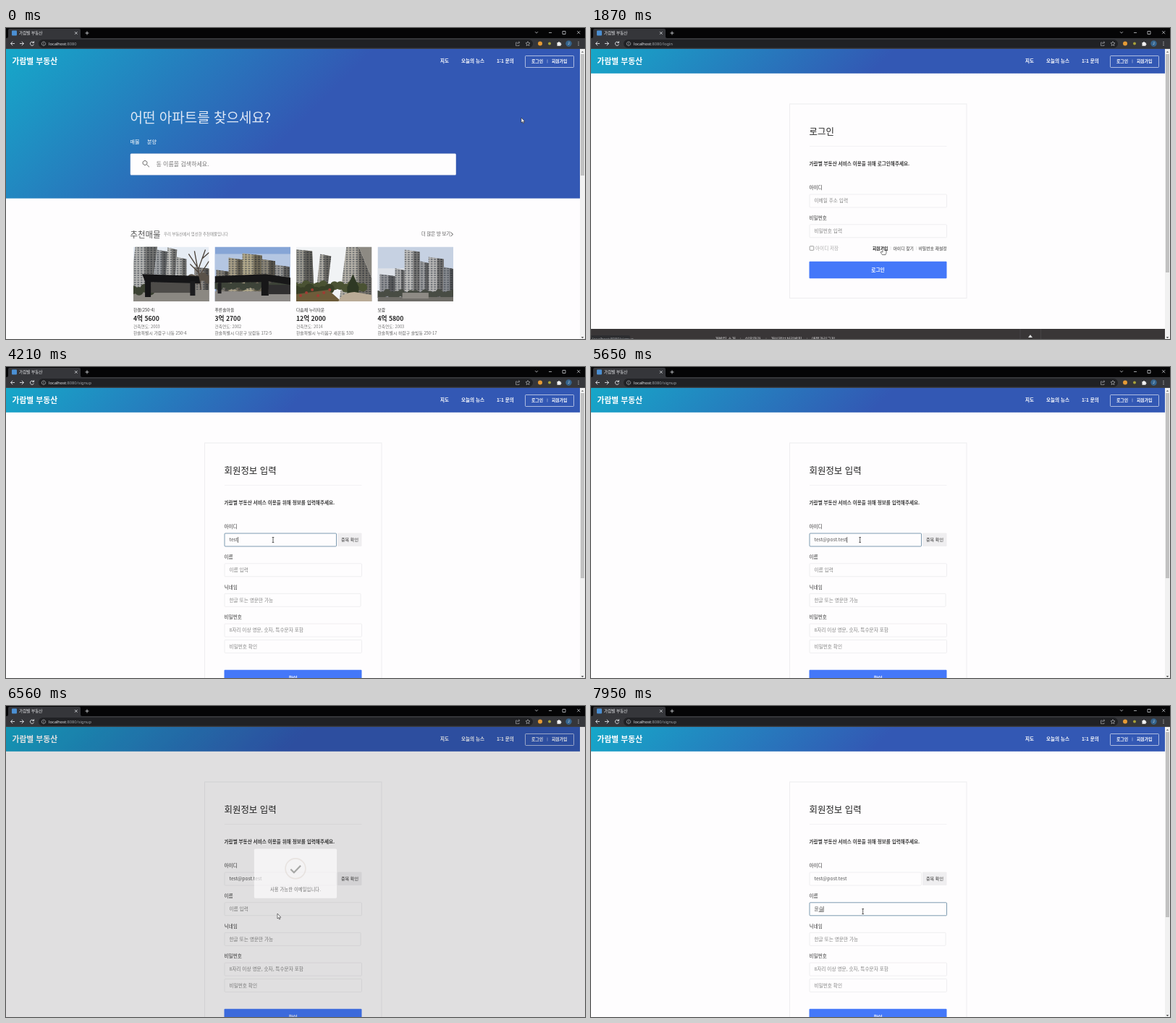
An HTML page that plays this animation: 800 by 430 pixels, repeating every 8000 ms.

```html
<!DOCTYPE html>
<html lang="ko">
<head>
<meta charset="utf-8">
<style>
html, body { margin: 0; width: 100%; height: 100%; overflow: hidden; }
svg { display: block; width: 800px; height: 430px; background: #fefdfe; }
svg svg { width: auto; height: auto; }
text { font-family: "Noto Sans CJK KR", "Noto Sans CJK", sans-serif; white-space: pre; }
.latin { font-family: "Noto Sans", sans-serif; }
</style>
</head>
<body>
<svg id="stage" viewBox="0 0 800 430"></svg>
<script>
const BRAND = '가람별 부동산', BLUE = '#4478f9', DARK = '#222', HINT = '#858585', EDGE = '#eeedef';

const rect = (x, y, w, h, fill, extra = '') =>
  `<rect x="${x}" y="${y}" width="${w}" height="${h}" fill="${fill}" ${extra}/>`;
const path = (d, fill, extra = '') => `<path d="${d}" fill="${fill}" ${extra}/>`;
const line = (d, color, width = 1) => path(d, 'none', `stroke="${color}" stroke-width="${width}"`);
const dot = (x, y, r, fill) => `<circle cx="${x}" cy="${y}" r="${r}" fill="${fill}"/>`;
// y is the vertical middle of the line of text
const text = (x, y, size, str, color = DARK, weight = 400, extra = '') =>
  `<text x="${x}" y="${y + size * .37}" font-size="${size}" fill="${color}" font-weight="${weight}" ${extra}>${str}</text>`;
const middle = 'text-anchor="middle"';

function browser() {
  const gray = '#dfe1e5';
  return rect(0, 0, 800, 28.6, '#050506') +
    path('M1 14Q3 14 3 12V3Q3 1 5 1H101Q103 1 103 3V12Q103 14 105 14Z', '#35363a') +
    rect(0, 14, 800, 14.6, '#35363a') + rect(45, 16, 683, 11.5, '#202124', 'rx="5.7"') +
    rect(8, 3.5, 7, 7, '#4b8fd2', 'rx="1"') + text(18, 7, 5.6, BRAND, '#e8eaed') +
    line('M95 5.2l3.6 3.6m0-3.6l-3.6 3.6M109.5 7h5M112 4.5v5', gray, .8) +
    line('M731 5.2l2 2 2-2M750 6.5h4M769 4.5h4v4h-4zM789.2 4.2l4 4m0-4l-4 4', gray, .7) +
    line('M12 21.5H6.5M9.2 18.8L6.5 21.5 9.2 24.2M19 21.5H24.5M21.8 18.8L24.5 21.5 21.8 24.2', gray, .9) +
    line('M38 20A2.6 2.6 0 1 0 38.5 22.5M38.6 18.3V20.6H36.3', gray, .9) +
    line('M52 19a2.7 2.7 0 1 0 .01 0M52 21.3v2M52 20v.7', '#b5b8bc', .7) +
    `<text class="latin" x="59" y="24" font-size="5.7" fill="#e8eaed">localhost<tspan fill="#9aa0a6">:8080<tspan id="route"></tspan></tspan></text>` +
    line('M706.5 20H704.5V24.5H709V23M706 22.5Q706.5 20 709.5 20M708 18.5l1.8 1.5-1.8 1.5', '#b5b8bc', .6) +
    line('M721 18.6l.9 2 2.1.2-1.6 1.5.5 2.2-1.9-1.2-1.9 1.2.5-2.2-1.6-1.5 2.1-.2z', '#c8cacd', .6) +
    dot(738, 21.5, 3, '#e59a35') + dot(751, 21.5, 2, '#a8a13a') +
    path('M761.5 20h1.5a1 1 0 1 1 2 0h1.5v1.5a1 1 0 1 1 0 2v1.3h-5z', '#f1f1f1') +
    dot(777.5, 21.5, 4.2, '#35658f') + text(777.5, 21.5, 4.5, 'J', '#fff', 400, middle) +
    [19.3, 21.5, 23.7].map(y => dot(791, y, .6, gray)).join('');
}

function header(h) {
  // 135 degree gradient spanning a box of width 793
  const half = (793 + h) / 4, cx = 396.5, cy = 28.6 + h / 2, id = 'sky' + h;
  return `<linearGradient id="${id}" gradientUnits="userSpaceOnUse" x1="${cx - half}" y1="${cy - half}" x2="${cx + half}" y2="${cy + half}">
    <stop stop-color="#16a8c9"/><stop offset=".51" stop-color="#3358b4"/></linearGradient>` +
    rect(0, 28.6, 793, h, `url(#${id})`) +
    text(8.5, 46.5, 10.8, BRAND, '#fff', 700) +
    text(600, 46, 6.55, '지도', '#fff', 700) + text(629, 46, 6.55, '오늘의 뉴스', '#fff', 700) +
    text(678, 46, 6.55, '1:1 문의', '#fff', 700) +
    rect(717.5, 38.5, 67, 16, 'none', 'stroke="#fff" stroke-opacity=".75" stroke-width=".8" rx="1"') +
    text(726, 46, 5.83, '로그인', '#fff', 700) + text(754, 46, 5.83, '회원가입', '#fff', 700) +
    line('M748 43.5v5', '#c3cfec', .6);
}

const facade = d => path(d, '#000', 'opacity=".08"') + path(d, 'url(#windows)') + path(d, 'url(#side)');
const tower = (x, top, w, color, lean = 0) => {
  const d = `M${x} 76L${x + lean} ${top}l${w} 3L${x + w} 76Z`;
  return path(d, color) + facade(d);
};
// a row of round tree tops between two points
const trees = (x, y, n, r, color) => Array.from({ length: n }, (_, i) =>
  dot(x + i * r * 1.3, y + Math.sin(i * 2.3) * r * .4, r, color)).join('');
const photos = [
  rect(0, 0, 104, 76, '#e6ecf4') + tower(-6, -4, 30, '#c9c9c6', 9) + tower(26, 4, 17, '#b0b2b4', 6) +
    tower(43, 1, 13, '#d2d1cd', 4) + tower(59, 14, 14, '#c4c3bf') + tower(84, 28, 24, '#9a958e') +
    line('M93 60L89 30 76 10M89 32L99 4M88 28L84 6M91 40L104 20M90 36L78 24M95 16L104 8', '#4a4038', 1.3) +
    trees(80, 44, 5, 6, '#5a5249') + rect(0, 60, 104, 16, '#8b8882') + trees(0, 60, 4, 6, '#3c4233') +
    rect(24, 49, 58, 15, '#4e4c49') +
    path('M12 38L90 41 92 51 24 49V70H16V48Z', '#151517') + rect(78, 48, 7, 20, '#1c1c1e'),
  rect(0, 0, 104, 76, '#86a5d6') + rect(0, 10, 104, 34, '#b4c6e2') + tower(2, 32, 20, '#8f8b80') +
    tower(19, 15, 20, '#b8ae92') + tower(38, 9, 27, '#c4b998') + tower(64, 17, 19, '#989181') + tower(83, 25, 20, '#a9a8a5') +
    trees(0, 54, 17, 5, '#3d4338') + rect(0, 62, 104, 14, '#8f8c89') +
    path('M0 41L70 38 104 43V53L74 48V68H64V49L0 50Z', '#171718') + rect(74, 53, 30, 13, '#302f30') + rect(4, 50, 5, 15, '#1e1e1f'),
  rect(0, 0, 104, 76, '#f1f3f5') + tower(-4, 3, 29, '#aaa89e', -3) + tower(26, 10, 15, '#bebbb2', 7) +
    path('M60 70L69 0H86L104 44V76H60Z', '#c6c2b8') + facade('M60 70L69 0H86L104 44V76H60Z') +
    path('M86 0H104V44Z', '#8d8a83') + trees(-2, 55, 13, 6, '#4a5233') + trees(0, 61, 6, 7, '#383f27') +
    path('M70 56l8-18 8 18v12H70z', '#2e3824') + path('M0 66L44 60 62 76H0Z', '#6d5c3a') +
    [6, 14, 22, 30, 38, 46].map((x, i) => dot(x, 68 - i % 3 * 4, 2, '#a03c34')).join('') +
    path('M58 76Q62 64 80 63L104 67V76Z', '#b9ab97'),
  rect(0, 0, 104, 76, '#c6d1e2') + rect(0, 30, 104, 46, '#dde1e8') + tower(3, 38, 22, '#9fa1a5') + tower(24, 30, 15, '#bdbdbd') +
    tower(37, 4, 21, '#d0cfcd') + tower(58, 20, 13, '#a9aaac') + tower(70, 14, 21, '#c9c8c7') + tower(90, 28, 16, '#96999e') +
    trees(0, 66, 17, 5, '#484c44') + rect(0, 70, 104, 6, '#6f6d68') + rect(34, 64, 36, 8, '#8e8b85')
];
const homes = [
  ['한결(250-4)', '4억 5600', 2003, '가람구 나동 250-4'],
  ['푸른솔마을', '3억 2700', 2002, '다온구 보람동 172-5'],
  ['다솜채 누리타운', '12억 2000', 2014, '누리봄구 새온동 530'],
  ['보람', '4억 5800', 2003, '하람구 솔빛동 250-17']
];

function homePage() {
  return header(207) + text(171.5, 123.8, 19, '어떤 아파트를 찾으세요?', '#dfe8f6', 300) +
    text(171.5, 157.5, 7.1, '매물', '#fff', 500) + text(195, 157.5, 7.1, '분양', '#fff', 500) +
    rect(171.7, 173.4, 450.2, 30, '#fefdfe', 'rx="1.5" stroke="#24428f" stroke-opacity=".25" stroke-width=".8"') +
    line('M192 183.5a3 3 0 1 0 .01 0M194.3 188.7L198 192.3', '#666', 1) +
    text(207.5, 188.5, 8, '동 이름을 검색하세요.', '#777') +
    text(171.5, 285.5, 11.4, '추천매물', '#555', 300) +
    text(218, 285, 5.4, '우리 부동산에서 엄선한 추천매물입니다', HINT) +
    text(574, 285, 6.3, '더 많은 방 보기', '#555') + line('M614.5 282.5l3 2.7-3 2.7', '#555', 1) +
    homes.map(([name, price, year, place], i) => {
      const x = 176 + i * 112.5;
      return `<svg x="${x}" y="302.5" width="104.5" height="75.5" viewBox="0 0 104 76" preserveAspectRatio="none" style="width:104.5px;height:75.5px">${photos[i]}</svg>` +
        text(x, 390, 5.83, name, '#333') + text(x, 401.5, 8.65, price, '#222', 700) +
        text(x, 413, 5.7, '건축연도: ' + year, '#777') + text(x, 421.5, 5.83, '한솔특별시 ' + place, '#666');
    }).join('');
}

const card = (h, title) => header(34.2) + rect(274.5, 105, 244.5, h, 'none', `stroke="${EDGE}"`) +
  text(301.5, 143, 12.45, title) + line('M302 163.5H491.5', '#f3f2f4');
const lead = (y, str) => text(301.5, y, 6.6, str, '#3a3a3a', 700);
const box = (y, w = 189.5, id = '') =>
  rect(302, y, w, 18, '#fefdfe', `${id && `id="${id}"`} rx="1" stroke="${EDGE}" stroke-width=".9"`);
const field = (label, y, hint, w) => (label && text(301.5, y - 18, 6.6, label, '#333')) + box(y - 9, w) + text(308.5, y, 6.67, hint, HINT);
const button = (y, label, id = '') => rect(301.5, y, 190, 23.5, BLUE, `rx="1" ${id && `id="${id}"`}`) +
  text(396.5, y + 11.8, 6.67, label, '#fff', 700, middle);

function footer(y) {
  const items = [[171.5, '개발팀 소개'], [213, '이용약관'], [248.5, '개인정보처리방침'], [305, '매물관리규정']];
  return rect(0, y, 793, 40, '#393637') + line(`M0 ${y + 27}H793`, '#2f2c2d') +
    items.map(([x, s]) => text(x, y + 14, 5.83, s, '#d5d4d5')).join('') +
    line([206.5, 242, 298.5].map(x => `M${x} ${y + 12}v5`).join(''), '#6a6768', .7) +
    line(`M593 ${y}v27M621.5 ${y}v27`, '#4b4849', .8) +
    path(`M604 ${y + 12}l3-4 3 4z`, '#ddd') + text(607, y + 18.5, 5.2, 'TOP', '#ccc', 400, middle);
}

function loginPage() {
  return card(268.5, '로그인') + lead(188, BRAND + ' 서비스 이용을 위해 로그인해주세요.') +
    field('아이디', 239, '이메일 주소 입력') + field('비밀번호', 280.8, '비밀번호 입력') +
    rect(302.2, 301.7, 5.6, 5.6, '#fff', 'rx=".8" stroke="#777" stroke-width=".7"') + text(310, 304.5, 6.6, '아이디 저장', '#aaa') +
    text(389, 304.5, 5.83, '회원가입', DARK, 700) + text(417.5, 304.5, 5.83, '아이디 찾기', '#333') +
    text(452.5, 304.5, 5.83, '비밀번호 재설정', '#333') + line('M414 302v5M449.5 302v5', '#ddd', .6) +
    button(322.8, '로그인') + footer(416);
}

function termsPage() {
  const rows = [[198, '모두 동의합니다.', '#333'], [226, '[필수] 만 14세 이상입니다.', '#555'],
    [244, `[필수] ${BRAND} 서비스 이용약관 동의`, '#555'], [262.3, '[필수] 개인정보 수집 및 이용 동의', '#555']];
  return card(255.5, '회원가입') + lead(174.5, `환영합니다! ${BRAND} 서비스 이용약관에 동의해주세요.`) +
    rows.map(([y, s, c], i) => text(311, y, 6.6, s, c) +
      rect(302.2, y - 3, 6, 6, '#fff', 'rx=".8" stroke="#777" stroke-width=".7"') +
      (i ? line(`M486.5 ${y - 3}l3.5 3-3.5 3`, '#888', .8) : '')).join('') +
    `<g id="checks">${rows.map(([y]) => rect(301.7, y - 3.5, 7, 7, '#1a73e8', 'rx="1"') +
      line(`M303.3 ${y}l1.4 1.5 2.6-3`, '#fff', 1)).join('')}</g>` +
    text(301.5, 282.7, 5.75, '만 14세 이상 회원 가입 가능합니다.', '#999') +
    text(301.5, 292.3, 5.75, '해당 내용은 <tspan fill="#3d8be8">이용약관 및 정책</tspan> 에서도 확인이 가능합니다.', '#999') +
    button(310, '동의하고 진행하기', 'agree') + footer(403);
}

const entry = (id, y, hint) => text(308.5, y, 6.67, hint, HINT, 400, `id="${id}Hint"`) + text(308.5, y, 6.67, '', '#555', 400, `id="${id}Text"`);

function infoPage() {
  return card(400, '회원정보 입력') + lead(188, BRAND + ' 서비스 이용을 위해 정보를 입력해주세요.') +
    text(301.5, 221, 6.6, '아이디', '#333') + box(230, 154.5, 'mailBox') + entry('mail', 239, '이메일 주소 입력') +
    rect(458, 229.5, 33.5, 18.5, '#efeef0', 'rx="1"') + text(475, 239, 6.1, '중복 확인', '#333', 400, middle) +
    text(301.5, 262.8, 6.6, '이름', '#333') + box(271.8, 189.5, 'nameBox') + entry('name', 280.8, '이름 입력') +
    field('닉네임', 322.3, '한글 또는 영문만 가능', 188) + field('비밀번호', 364, '8자리 이상 영문, 숫자, 특수문자 포함') +
    field('', 386.3, '비밀번호 확인') + button(418.8, '확인') + rect(0, 0, .7, 8, '#333', 'id="caret"');
}

const views = { home: homePage, login: loginPage, terms: termsPage, info: infoPage };
const thumbs = { home: 168, login: 302, terms: 310, info: 256 };
const routes = { home: '', login: '/login', terms: '/signup', info: '/signup' };
const cursors = {
  arrow: path('M0 0V7L1.6 5.6 2.7 8 3.8 7.5 2.7 5.2H4.8Z', '#fff', 'stroke="#222" stroke-width=".6"'),
  hand: path('M-1 1Q0-.5 1 1V4L4 5Q4.5 8 3 10.5H-1.5L-4 7Q-3.5 5.5-1 7Z', '#fff', 'stroke="#222" stroke-width=".6"'),
  ibeam: line('M-1.3-3.5H1.3M0-3.5V3.5M-1.3 3.5H1.3', '#333', .8)
};
const groups = (set, draw) => Object.keys(set).map(k => `<g id="${k}">${draw(set[k])}</g>`).join('');
const $ = id => document.getElementById(id);

$('stage').innerHTML =
  `<pattern id="windows" width="4.5" height="3.2" patternUnits="userSpaceOnUse">${rect(.8, .7, 2.8, 1.6, '#343a44', 'opacity=".62"')}</pattern>
  <linearGradient id="side"><stop offset=".5" stop-opacity="0"/><stop offset=".62" stop-opacity=".38"/></linearGradient>` +
  groups(views, draw => draw()) +
  `<g id="scroll">${rect(793, 28.6, 7, 402, '#f1f1f1')}${rect(794, 36, 5, 0, '#c1c1c1', 'id="thumb"')}
    ${path('M794.8 34l1.7-2 1.7 2z', '#777')}${path('M794.8 427l1.7 2 1.7-2z', '#444')}</g>` +
  `<g id="status">${path('M0 425H52Q54 425 54 427V430H0Z', '#2c2d30')}
    <text id="link" class="latin" x="2" y="431.5" font-size="5.5" fill="#a5a8ac"></text></g>` +
  rect(0, 28.6, 800, 402, '#000', 'id="shade"') +
  `<g id="modal">${rect(-68.5, -40.8, 137, 81.8, '#fefdfe', 'rx="2"')}
    <circle cy="-8" r="16.7" fill="none" stroke="#ece6e1" stroke-width="2"/>
    <path id="tick" d="M-8-7L-2.5-1.5 8.5-13" fill="none" stroke="#8c8d8a" stroke-width="2.6" pathLength="1" stroke-dasharray="1 2"/>
    ${text(0, 27, 7.5, '사용 가능한 이메일입니다.', '#444', 400, middle + ' letter-spacing=".15"')}</g>` +
  browser() + `<g id="pointer">${groups(cursors, shape => shape)}</g>`;

const OPEN = 5780, CLOSE = 6516;
const pageTimes = [[0, 'home'], [1120, 'login'], [1920, 'terms'], [3150, 'info']];
const linkTimes = [[0, ''], [520, 'login'], [1260, ''], [1740, 'signup'], [2020, '']];
const cursorTimes = [[0, 'arrow'], [480, 'hand'], [1250, 'arrow'], [1680, 'hand'], [2000, 'arrow'], [2980, 'hand'],
  [3200, 'arrow'], [3540, 'ibeam'], [5720, 'hand'], [OPEN, 'arrow'], [6760, 'ibeam']];
const focusTimes = [[0, ''], [3680, 'mail'], [5750, ''], [6900, 'name']];
const nameTimes = [[0, ''], [7090, 'd'], [7200, 'db'], [7360, 'd'], [7430, ''], [7500, 'ㅇ'], [7570, '유'], [7640, '윤'],
  [7720, '윤ㅅ'], [7800, '윤스'], [7920, '윤슬']];
const mailTimes = [[0, ''], ...[...'test@post.test'].map((c, i, all) =>
  [i < 4 ? 3950 + i * 67 : 4480 + (i - 4) * 88, all.slice(0, i + 1).join('')])];
const moves = [[0, 712, 124], [50, 712, 124], [600, 778, 48], [850, 779, 49], [910, 753, 49], [1120, 753, 49], [1760, 404, 303],
  [1960, 404, 303], [2290, 304, 197], [2440, 304, 197], [2790, 428, 372], [2850, 428, 372], [3060, 400, 322], [3170, 400, 322],
  [3620, 369, 239], [5640, 369, 239], [5760, 482, 238], [6060, 482, 238], [6430, 375, 287], [6620, 375, 287], [6880, 375.7, 284]];

const at = (list, t) => list.findLast(([start]) => t >= start)[1];
const clamp = x => Math.min(1, Math.max(0, x));
const show = (id, on) => $(id).setAttribute('visibility', on ? 'visible' : 'hidden');
const set = (id, name, value) => $(id).setAttribute(name, value);
const pick = (all, key) => Object.keys(all).forEach(k => $(k).style.display = k === key ? '' : 'none');

function position(t) {
  const i = moves.findIndex(([time]) => time > t);
  if (i < 0) return moves.at(-1).slice(1);
  const [a, b] = [moves[i - 1], moves[i]], p = (t - a[0]) / (b[0] - a[0]), e = p * p * (3 - 2 * p);
  return [a[1] + (b[1] - a[1]) * e, a[2] + (b[2] - a[2]) * e];
}

function popScale(p) {
  if (p < .45) return .7 + .35 * p / .45;
  return p < .8 ? 1.05 - .1 * (p - .45) / .35 : .95 + .05 * (p - .8) / .2;
}

function drawEntry(id, value, focused) {
  const composing = /[ㄱ-힣]$/.test(value);
  $(id + 'Text').innerHTML = composing
    ? value.slice(0, -1) + `<tspan text-decoration="underline">${value.slice(-1)}</tspan>` : value;
  $(id + 'Hint').style.display = value ? 'none' : '';
  set(id + 'Box', 'stroke', focused ? '#6f8fa8' : EDGE);
  if (focused) {
    set('caret', 'x', 308.5 + (value ? $(id + 'Text').getComputedTextLength() : 0));
    set('caret', 'y', id === 'mail' ? 235 : 276.8);
  }
}

function draw(t) {
  const page = at(pageTimes, t), link = at(linkTimes, t), focus = at(focusTimes, t);
  pick(views, page);
  $('route').textContent = routes[page];
  set('thumb', 'height', thumbs[page]);
  show('scroll', t < OPEN || t > CLOSE + 140);
  show('status', link);
  $('link').textContent = 'localhost:8080/' + link;
  show('checks', t > 2400);
  set('agree', 'fill', t > 2970 ? '#3c6de8' : BLUE);

  drawEntry('mail', at(mailTimes, t), focus === 'mail');
  drawEntry('name', at(nameTimes, t), focus === 'name');
  show('caret', focus);

  const leave = clamp((t - CLOSE) / 135), fade = clamp((t - CLOSE) / 100);
  set('shade', 'opacity', .39 * clamp((t - OPEN) / 100) * (1 - fade) ** 2);
  const scale = popScale(clamp((t - OPEN) / 300)) * (1 - .5 * leave);
  set('modal', 'transform', `translate(400 231.5) scale(${scale})`);
  set('modal', 'opacity', clamp((t - OPEN) / 135) * (1 - leave));
  const drawn = clamp((t - OPEN - 405) / 245);
  set('tick', 'stroke-dashoffset', 1 - drawn);
  $('tick').style.display = drawn ? '' : 'none';

  pick(cursors, at(cursorTimes, t));
  set('pointer', 'transform', `translate(${position(t)})`);
}

function loop() {
  draw(performance.now() % 8000);
  requestAnimationFrame(loop);
}
loop();
</script>
</body>
</html>
```
